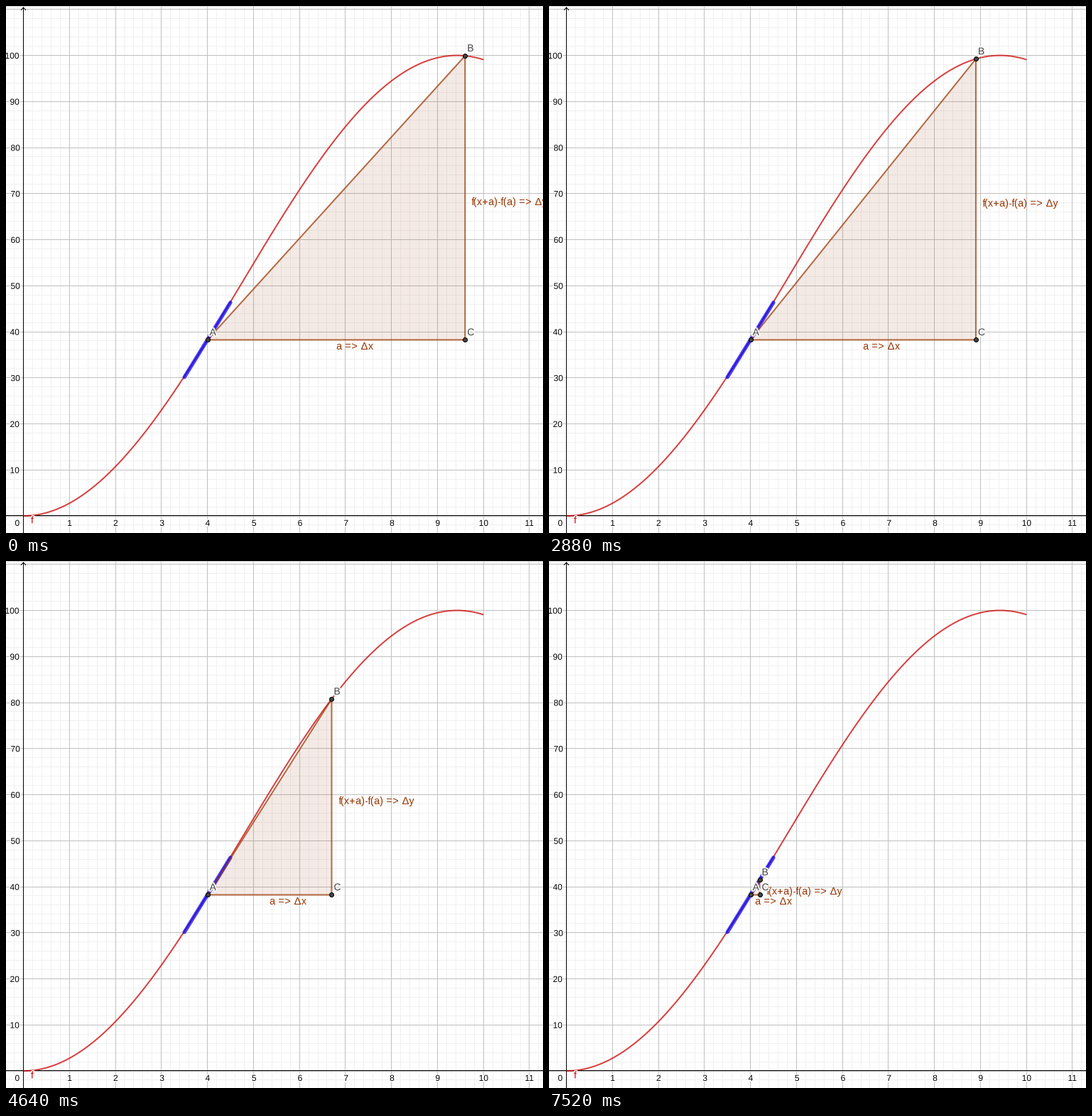
Animation of 756x741 px, one loop 8 s. Source, as a matplotlib script:

```python
import numpy as np
import matplotlib.pyplot as plt
import matplotlib.patheffects as pe
from matplotlib.animation import FuncAnimation
from matplotlib.collections import LineCollection
from matplotlib.patches import Polygon

W, H, DPI = 756, 741, 100
PT = 72 / DPI                      # points per pixel
STEP, LOOP = 40, 8000              # ms
X0, Y0, UX, UY = 24.5, 717, 64.77, 6.475
A = 4
BROWN, RED, BLUE, INK = "#993300", "#cc0000", "#0000ff", "#444444"

plt.rcParams.update({"font.family": "Liberation Sans",
                     "text.hinting": "force_autohint", "text.hinting_factor": 1})

# the slider creeps, with three quick drags in between
KEY_MS = [0, 760, 2840, 3320, 3720, 3880, 4600, 4640, 4840, 6040, 6680, 6840, 7520]
KEY_X = [9.6, 9.55, 8.95, 8.85, 7.6, 7, 6.86, 6.7, 5.94, 5.45, 5.35, 4.4, 4.25]


def f(x):
    return 50 * (1 - np.cos(x / 3))


def px(x):
    return X0 + UX * x


def py(y):
    return Y0 - UY * y


def slider(ms):
    """Position of B, rounded to steps of 0.1 (halves go down)."""
    return np.ceil(10 * np.interp(ms, KEY_MS, KEY_X) - 0.5 - 1e-6) / 10


fig = plt.figure(figsize=(W / DPI, H / DPI), dpi=DPI, facecolor="white")
ax = fig.add_axes([0, 0, 1, 1])
ax.set(xlim=(0, W), ylim=(H, 0))
ax.axis("off")


def write(x, y, s, size, color, halo=0, z=5, ha="left"):
    t = ax.text(x, y, s, fontsize=size * PT, color=color, ha=ha,
                va="baseline", zorder=z)
    if halo:
        t.set_path_effects([pe.withStroke(linewidth=halo * PT, foreground="white")])
    return t


def number(x, y, n, ha):
    write(x, y, str(n), 12, "black", 3, 1.5, ha)


def line(xs, ys, color, width, alpha=1, z=1, cap="butt"):
    ax.plot(xs, ys, color=color, lw=width * PT, alpha=alpha, zorder=z,
            solid_capstyle=cap, snap=False)


def grid(xs, ys, color, z):
    """Crisp one-pixel lines through pixel centres."""
    segs = [[(x, 0), (x, H)] for x in np.floor(px(xs)) + 0.5]
    segs += [[(0, y), (W, y)] for y in np.floor(py(ys)) + 0.5]
    ax.add_collection(LineCollection(segs, colors=color, linewidths=PT,
                                     zorder=z, snap=False))


# grid, axes and their numbers
grid(np.arange(-1, 57) / 5, np.arange(-1, 56) * 2, "#f0f0f0", 0)
grid(np.arange(12), np.arange(12) * 10, "#c0c0c0", 0.5)
line([0, W], [0.5, 0.5], "#cccccc", 1, z=0.6)
line([X0, X0], [2, H], "black", 1)
line([0, W], [716.5, 716.5], "black", 1)
line([X0 - 3.5, X0, X0 + 3.5], [6, 2, 6], "black", 1)
number(19.5, 731, 0, "right")
for n in range(1, 12):
    number(px(n) + 0.5, 731, n, "center")
for n in range(10, 101, 10):
    number(19.5, py(n) + 4.5, n, "right")

# curve and tangent at A
xs = np.linspace(0, 10, 400)
line(px(xs), py(f(xs)), RED, 2, 0.75, 2)
slope = 50 / 3 * np.sin(A / 3)
ends = np.array([-0.5, 0.5])
line(px(A + ends), py(f(A) + slope * ends), BLUE, 5.3, 0.72, 3, "round")

# difference triangle
tri = Polygon([(0, 0)] * 3, closed=True, facecolor=(0.6, 0.2, 0, 0.1),
              edgecolor=(0.6, 0.2, 0, 0.72), lw=2 * PT, joinstyle="round",
              zorder=4, snap=False)
ax.add_patch(tri)
dots, = ax.plot([], [], "o", ms=6 * PT, mfc=INK, mec="black", mew=PT,
                zorder=7, snap=False)
dx_text = write(0, 0, "a => Δx", 14, BROWN)
dy_text = write(0, 0, "f(x+a)-f(a) => Δy", 14, BROWN)
names = [write(0, 0, s, 14, INK, 3.5, 6) for s in "ABC"]
write(35, 727.5, "f", 14, RED, 3, 6)


def draw(i):
    x = slider(i * STEP)
    xa, ya, xb, yb = px(A), py(f(A)), px(x), py(f(x))
    pts = [(xa, ya), (xb, yb), (xb, ya)]
    tri.set_xy(pts)
    dots.set_data(*zip(*pts))
    for t, (u, v) in zip(names, pts):
        t.set_position((u + 3, v - 6.3))
    dx_text.set_position(((xa + xb) / 2, ya + 13.5))
    dy_text.set_position((xb + 9.4, (ya + yb) / 2 + 9.8))
    return tri, dots, dx_text, dy_text, *names


anim = FuncAnimation(fig, draw, frames=LOOP // STEP, interval=STEP,
                     repeat=True, repeat_delay=0)
plt.show()
```
